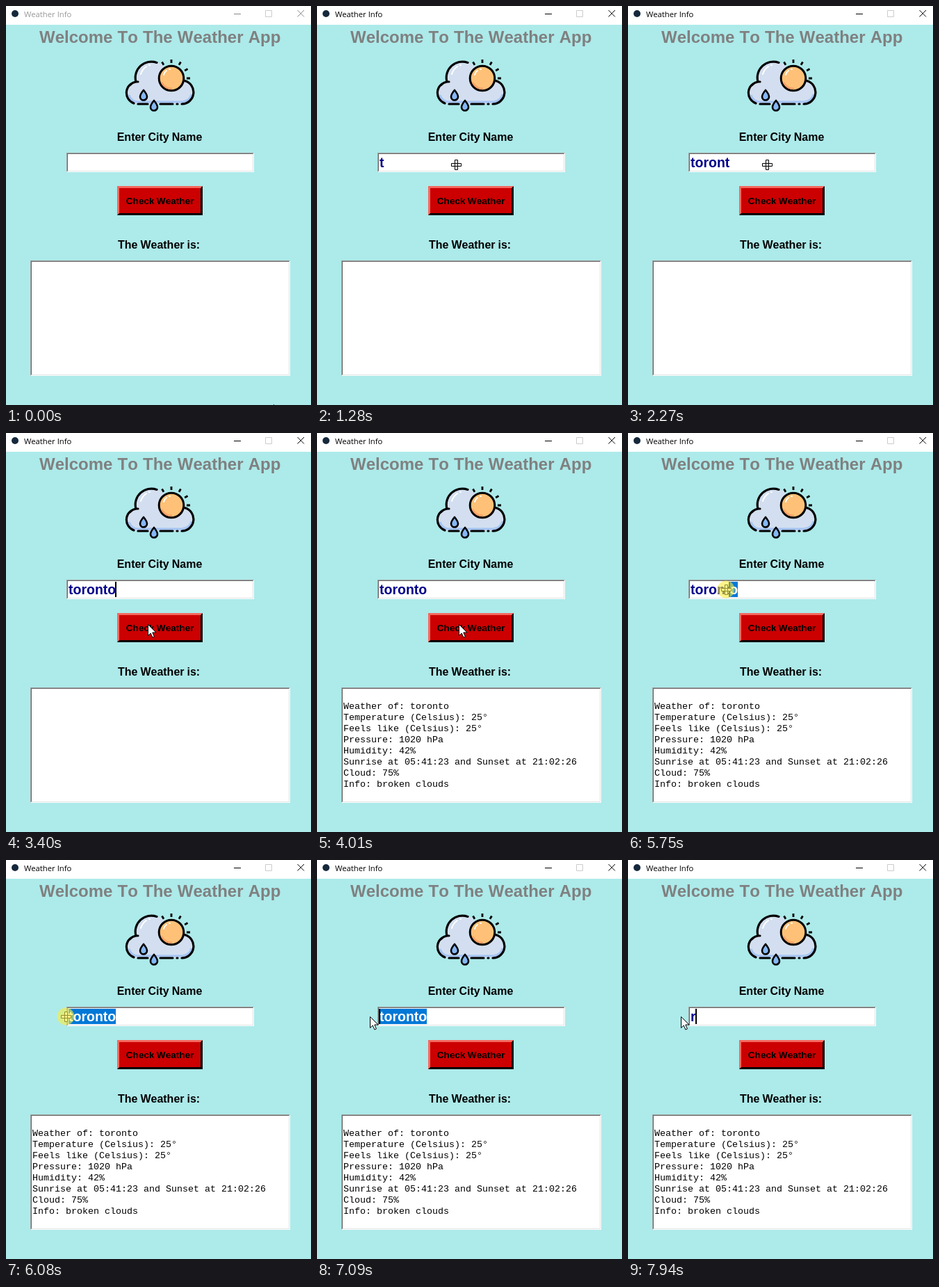
These frames come from a looping animation (439x574 px, 8000 ms). An HTML page:

```html
<!DOCTYPE html>
<html lang="en">
<head>
<meta charset="utf-8">
<title>Weather Info</title>
<style>
  html, body { margin: 0; width: 100%; height: 100%; overflow: hidden; background: #adeaea; }
  div, svg { position: absolute; box-sizing: border-box; }
  svg { left: 0; top: 0; }
  .bar { left: 0; top: 0; width: 439px; height: 27px; background: #fff; }
  .sunk { background: #fff; border: 1px solid; border-color: #a0a0a0 #fff #fff #a0a0a0; }
  .sunk::before { content: ""; position: absolute; inset: 0; border: 1px solid; border-color: #696969 #e3e3e3 #e3e3e3 #696969; }
  #entry { left: 87px; top: 211px; width: 270px; height: 28px; }
  #output { left: 35px; top: 366px; width: 374px; height: 166px; }
  #button { left: 160px; top: 259px; width: 123px; height: 42px; background: #cc0000;
    border: 3px solid; border-color: #f4685e #000 #000 #f4685e; }
  #button.down { background: #f0f0f0; border-color: #696969 #fff #fff #696969; }
  text { font: bold 16px "Liberation Sans", Arial, sans-serif; font-kerning: none; word-spacing: -.5px; white-space: pre; }
  #title { font: 11.3px "Open Sans", sans-serif; word-spacing: 0; }
  .head { font-size: 24px; fill: #808080; word-spacing: .5px; }
  #label { font-size: 13.6px; }
  #typed { font-size: 19.5px; fill: #00008b; }
  #picked { fill: #fff; }
  #report text { font: 13.333px "Liberation Mono", "Courier New", monospace; word-spacing: 0; }
  .line { fill: none; stroke: #000; stroke-width: 3.2; stroke-linecap: round; stroke-linejoin: round; }
  .shine { fill: none; stroke: #fff; stroke-width: 2; stroke-linecap: round; }
</style>
</head>
<body>
<div class="bar"></div>
<div id="entry" class="sunk"></div>
<div id="button"></div>
<div id="output" class="sunk"></div>

<svg width="439" height="574" viewBox="0 0 439 574">
  <circle cx="13" cy="11" r="5" fill="#16283c"/>
  <text id="title" x="26" y="16">Weather Info</text>
  <g fill="none">
    <path d="M373.5 6.5h9v9h-9z" stroke="#ccc"/>
    <path id="controls" d="M328 11.5h10M419.5 6l9.5 9.5M429 6l-9.5 9.5"/>
  </g>

  <text class="head" x="48" y="53">Welcome To The Weather App</text>
  <text x="159.7" y="194">Enter City Name</text>
  <text id="label" x="172.8" y="285">Check Weather</text>
  <text x="161" y="349">The Weather is:</text>

  <g id="icon">
    <path fill="#d3dff0" d="M190 141a16 16 0 0 1-2-32a23 23 0 0 1 42-18l25 16.500a17 17 0 0 1-2 33.500z"/>
    <path fill="none" stroke="#a4c4f4" stroke-width="3" d="M177 128q3 10 13 10h62q13-1 15-11"/>
    <path class="line" d="M184 140a16 16 0 0 1 4-31h2M178 114q4-4 9-5a23 23 0 0 1 30-27.600M257 107.500a17 17 0 0 1-4 33.500M190 141h14M222 141h18M246 141h1"/>
    <path class="shine" d="M194 98q2-7 8-11M206 85h1"/>
    <circle cx="238" cy="104" r="17.800" fill="#ffc177" stroke="#000" stroke-width="3"/>
    <path fill="none" stroke="#ff9f67" stroke-width="2.500" d="M224 110q5 9 15 9"/>
    <path class="shine" d="M227 99q1-4 4-6M235 91h1"/>
    <path fill="none" stroke="#000" stroke-width="2.800" d="M238 77v5M224.500 80.500l2.500 4.300M251.500 80.500l-2.500 4.300M261.500 90.500l-4.300 2.500M260 104h5"/>
    <g fill="#86b7f5" stroke="#000" stroke-width="2.600" stroke-linejoin="round">
      <path id="drop" d="M198 121q-5 6-5 9.500a5 5 0 0 0 10 0q0-3.500-5-9.500z"/>
      <use href="#drop" x="15" y="15"/>
    </g>
  </g>

  <rect id="mark" y="214" height="22" fill="#0078d7"/>
  <text id="typed" x="90" y="232"><tspan id="plain"></tspan><tspan id="picked"></tspan></text>
  <rect id="caret" y="214" width="2" height="22"/>
  <g id="report"></g>

  <g id="mouse">
    <path id="arrow" fill="#fff" stroke="#000" stroke-linejoin="round" d="M.5.5v16l3.700-3.500l2.700 6l2.500-1.100l-2.600-5.900h5.200z"/>
    <path id="cross" fill="#fff" stroke="#000" transform="translate(.5 .5)" d="M-2-7h4v5h5v4h-5v5h-4v-5h-5v-4h5zM-2-2h4v4h-4z"/>
    <circle id="halo" r="12.5" fill="#f8ec40" fill-opacity=".6"/>
  </g>
</svg>

<script>
const LOOP = 8000;
const LEFT = 90;
const $ = id => document.getElementById(id);
const show = (id, on) => $(id).style.display = on ? "" : "none";
const within = (t, [from, to]) => t >= from && t < to;

const report = [
  "Weather of: toronto",
  "Temperature (Celsius): 25°",
  "Feels like (Celsius): 25°",
  "Pressure: 1020 hPa",
  "Humidity: 42%",
  "Sunrise at 05:41:23 and Sunset at 21:02:26",
  "Cloud: 75%",
  "Info: broken clouds"
];
$("report").innerHTML = report.map((s, i) => `<text x="38" y="${397 + 16 * i}">${s}</text>`).join("");

const city = "toronto";
const keyTimes = [1280, 1480, 1670, 1870, 2130, 2270, 2480];
const focus = [600, 730], click = [3670, 3750], drag = [5600, 6280];
const retype = 7940;

// Mouse path: time, x, y
const path = [
  [0, 385, 573], [70, 385, 573], [200, 335, 500], [300, 260, 390], [400, 212, 300], [540, 200, 228],
  [3010, 200, 228], [3200, 207, 252], [3390, 204, 275],
  [5040, 204, 275], [5230, 197, 250], [5420, 184, 226],
  [5600, 184, 226], [5750, 141, 225], [5950, 105, 225], [6150, 76, 225], [LOOP, 76, 225]
];

function mouseAt(t) {
  const i = path.findIndex(p => p[0] > t);
  const [t0, x0, y0] = path[i - 1], [t1, x1, y1] = path[i];
  const k = (t - t0) / (t1 - t0);
  return [x0 + (x1 - x0) * k, y0 + (y1 - y0) * k].map(Math.round);
}

const pen = document.createElement("canvas").getContext("2d");
pen.font = 'bold 19.5px "Liberation Sans", Arial, sans-serif';
pen.fontKerning = "none";
const edge = s => Math.round(LEFT + pen.measureText(s).width);
const gaps = Array.from({ length: city.length + 1 }, (_, i) => edge(city.slice(0, i)));

function nearestGap(x) {
  return gaps.reduce((best, g, i) => Math.abs(g - x) < Math.abs(gaps[best] - x) ? i : best, 0);
}

function drawEntry(t, x) {
  const text = t >= retype ? "r" : city.slice(0, keyTimes.filter(k => t >= k).length);
  let at = text.length;
  if (t >= drag[0] && t < retype) at = t < drag[1] ? nearestGap(x + 5) : 0;
  const caretX = edge(text.slice(0, at)), end = edge(text);
  $("plain").textContent = text.slice(0, at);
  $("picked").textContent = text.slice(at);
  $("mark").setAttribute("x", caretX);
  $("mark").setAttribute("width", end - caretX);
  $("caret").setAttribute("x", caretX - 1);
  const since = t - 645;
  show("caret", t >= retype || since >= 0 && since % 917 < 610);
}

function draw(t) {
  const [x, y] = mouseAt(t);
  const active = t >= focus[0], done = t >= 4010;
  $("title").style.fill = active ? "#000" : "#999";
  $("controls").style.stroke = active ? "#000" : "#888";

  const down = t >= click[0] && !done;
  $("button").className = down ? "down" : "";
  $("label").setAttribute("transform", down ? "translate(1 1)" : "");
  show("report", done);
  drawEntry(t, x);

  const overEntry = x > 87 && x < 357 && y > 211 && y < 239;
  const cross = overEntry || within(t, drag);
  $("mouse").setAttribute("transform", `translate(${x} ${y})`);
  show("cross", cross);
  show("arrow", !cross);
  show("halo", [focus, click, drag].some(span => within(t, span)));
}

let start;
function tick(now) {
  start ??= now;
  draw((now - start) % LOOP);
  requestAnimationFrame(tick);
}
draw(0);
requestAnimationFrame(tick);
</script>
</body>
</html>
```
